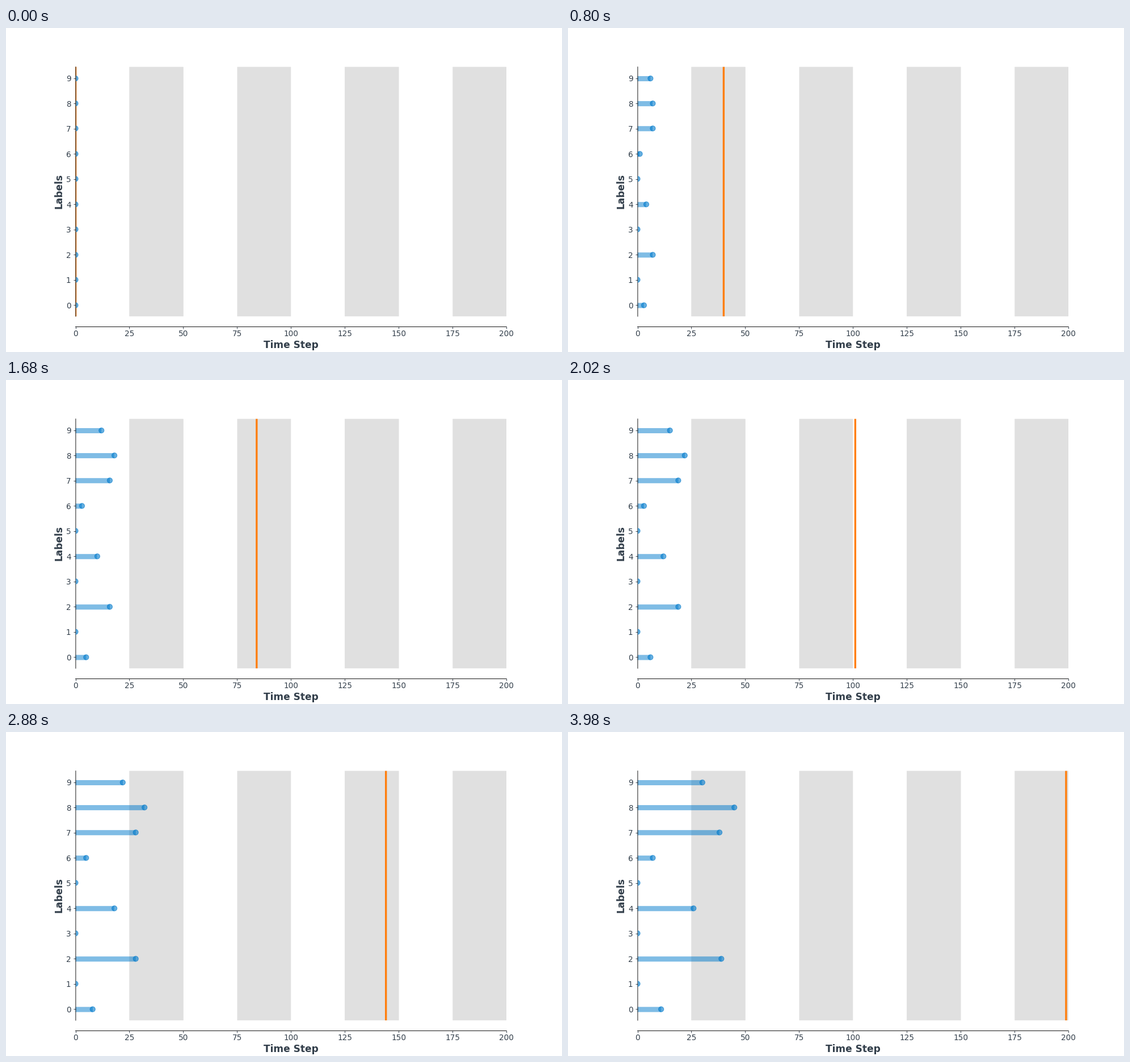
Write a matplotlib script that moves like this. It is 980 px wide and 572 px high and loops after 4 s.

```python
import numpy as np
import matplotlib.pyplot as plt
from matplotlib.animation import FuncAnimation

W, H, DPI = 980, 572, 100
STEPS = 200
S = W / 1200                       # the chart is laid out on a 1200 px wide grid
PX = 72 / DPI                      # points per pixel
UX, UY = 930 / STEPS, 539 / 9.9    # grid pixels per time step and per label
TOP = 9.45
SLATE, BLUE, ORANGE = "#333F4B", "#007ACC", "#FF7F0E"

# Each label fires at a steady rate (spikes per step) after a small offset
RATE = np.array([0.055, 0, 0.2, 0, 0.133, 0, 0.036, 0.195, 0.235, 0.153])
OFFSET = np.array([0.8, 0, -0.5, 0, -0.45, 0, 0, 0, -1.45, 0])


def counts(step):
    """Whole spikes counted so far, one value per label."""
    return np.floor(np.maximum(0, RATE * step + OFFSET))


def snap_x(step):
    """Move a time step to the nearest column of the layout grid."""
    return np.floor(UX * step + 0.5) / UX


def snap_y(label):
    """Move a label to the nearest row of the layout grid."""
    return TOP - np.floor(UY * (TOP - label) + 0.5001) / UY


fig, ax = plt.subplots(figsize=(W / DPI, H / DPI), dpi=DPI)
fig.subplots_adjust(left=0.125, right=0.9, bottom=0.11, top=0.88)
ax.set_xlim(0, STEPS)
ax.set_ylim(-0.45, TOP)

for side in ("top", "right"):
    ax.spines[side].set_visible(False)
for side, shift in (("left", -0.41), ("bottom", 18.38)):
    spine = ax.spines[side]
    spine.set_position(("outward", shift * PX))
    spine.set(linewidth=0.8 * S, color="black", snap=False)

ax.set_xticks(range(0, STEPS + 1, 25))
ax.set_yticks(range(10))
ax.tick_params(colors=SLATE, labelsize=12 * S, length=3.5 * S, width=0.8 * S)
ax.tick_params(axis="x", pad=3.5 * S - 1.95)
ax.tick_params(axis="y", pad=3.5 * S + 0.3)

label = dict(fontsize=15 * S, fontweight="bold", color=SLATE)
ax.set_xlabel("Time Step", labelpad=4 * S, **label)
ax.set_ylabel("Labels", va="baseline", **label)
ax.yaxis.set_label_coords(98.9 / W, 0.4965, transform=fig.transFigure)


def band(left, right, color):
    return ax.axvspan(left, right, facecolor=color, edgecolor="none",
                      snap=False, clip_on=False)


for start in range(25, STEPS, 50):
    band(snap_x(start), snap_x(start + 25), "#E0E0E0")

half = 1.5 * DPI / 72 / UX         # half of a 3 pt line, in time steps
cursor = band(0, half, ORANGE)
dot_y = snap_y(np.arange(10))
bar_y = dot_y - 0.5 / UY
bars = ax.hlines(bar_y, 0, np.zeros(10), color=BLUE, alpha=0.5,
                 linewidth=8 * S, snap=False, clip_on=False)
dots = ax.scatter(np.zeros(10), dot_y, s=np.full(10, (8 * S) ** 2),
                  color=BLUE, alpha=0.6, linewidth=S, zorder=3)


def draw(step):
    n = counts(step)
    x = snap_x(step)
    left = max(0, x - half)
    cursor.set_x(left)
    cursor.set_width(x + half - left)
    bars.set_segments([[(0, y), (v, y)] for y, v in zip(bar_y, n)])
    dots.set_offsets(np.column_stack([snap_x(n), dot_y]))
    return cursor, bars, dots


anim = FuncAnimation(fig, draw, frames=STEPS, interval=20,
                     init_func=lambda: draw(0), repeat=True, repeat_delay=0)
plt.show()
```
